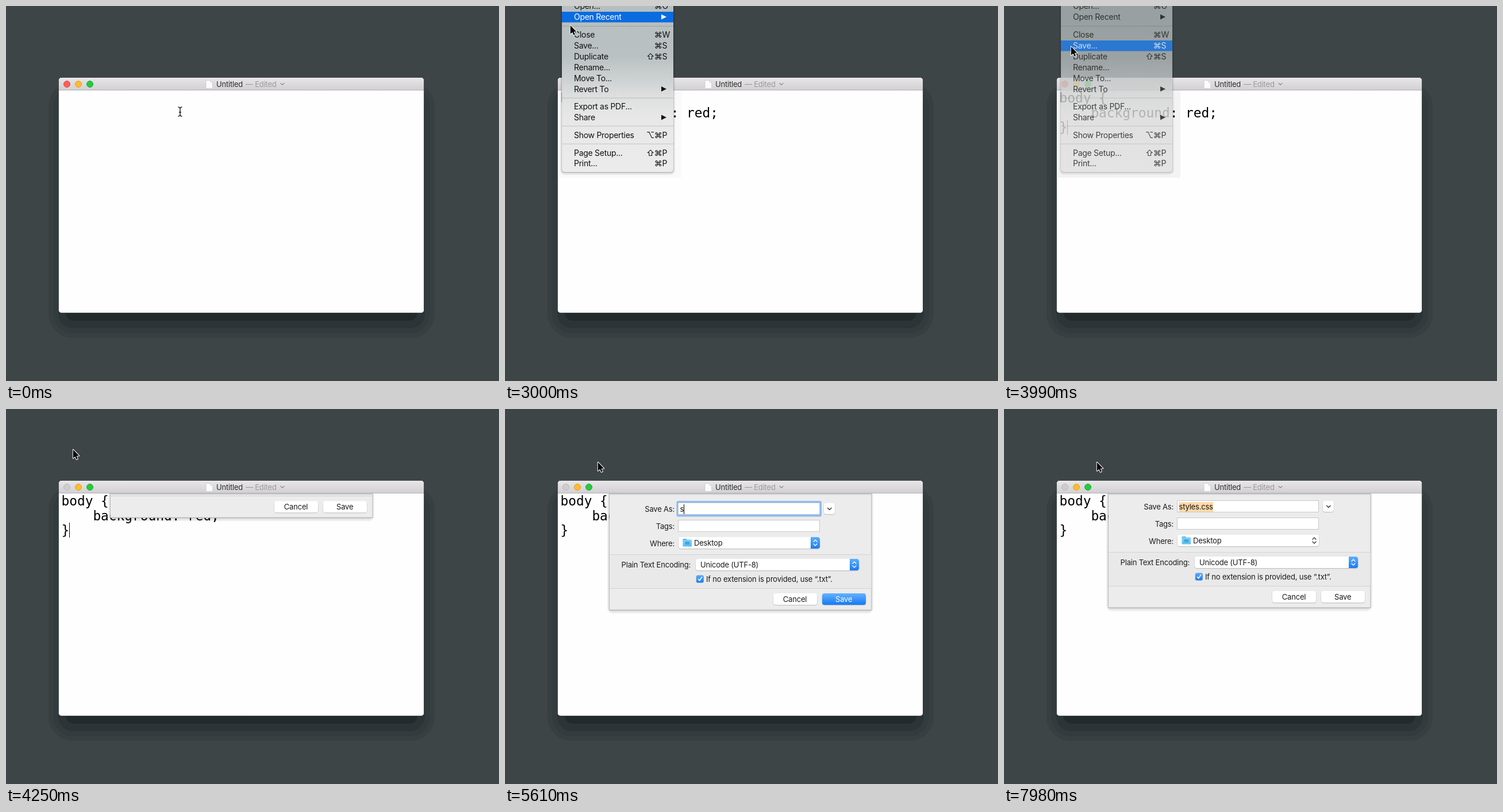
An HTML page with a canvas that plays this animation: 858 by 653 pixels, repeating every 8000 ms.

```html
<!DOCTYPE html>
<html lang="en">
<head>
<meta charset="utf-8">
<title>Saving a stylesheet</title>
<style>
html, body { margin: 0; width: 100%; height: 100%; overflow: hidden; background: #3d4547; }
canvas { display: block; }
</style>
</head>
<body>
<canvas id="stage" width="858" height="653"></canvas>
<script>
const ctx = document.getElementById('stage').getContext('2d');
const LOOP = 8000;
const UI = 'Inter, Roboto, "DejaVu Sans", sans-serif';
const MONO = '"DejaVu Sans Mono", "Liberation Mono", monospace';

function box(x, y, w, h, r, fill, stroke) {
  ctx.beginPath();
  ctx.roundRect(x, y, w, h, r);
  if (fill) { ctx.fillStyle = fill; ctx.fill(); }
  if (stroke) { ctx.strokeStyle = stroke; ctx.lineWidth = 1; ctx.stroke(); }
}

function rect(x, y, w, h, fill) {
  ctx.fillStyle = fill;
  ctx.fillRect(x, y, w, h);
}

function line(points, color, width, close) {
  ctx.beginPath();
  points.forEach(([x, y], i) => i ? ctx.lineTo(x, y) : ctx.moveTo(x, y));
  if (close) ctx.closePath();
  ctx.strokeStyle = color;
  ctx.lineWidth = width;
  ctx.lineCap = ctx.lineJoin = 'round';
  ctx.stroke();
}

function shape(points, fill) {
  ctx.beginPath();
  points.forEach(([x, y]) => ctx.lineTo(x, y));
  ctx.closePath();
  ctx.fillStyle = fill;
  ctx.fill();
}

function text(str, x, y, color = '#1a1a1a', size = 13, align = 'left') {
  ctx.font = size + 'px ' + UI;
  ctx.letterSpacing = size > 13 ? '-0.28px' : '-0.2px';
  ctx.textAlign = align;
  ctx.fillStyle = color;
  ctx.fillText(str, x, y);
}

function fade(y0, y1, ...stops) {
  const g = ctx.createLinearGradient(0, y0, 0, y1);
  stops.forEach((c, i) => g.addColorStop(i / (stops.length - 1), c));
  return g;
}

// Last entry whose time has come
const at = (list, t) => list.reduce((found, e) => e[0] <= t ? e : found, null);

// ---- window ----
function drawWindow(t) {
  rect(0, 0, 858, 653, '#3d4547');
  [[0, '#373f41'], [8, '#323b3d'], [17, '#2b3436'], [30, '#222a2c']].forEach(([d, c]) =>
    box(74 + d, 133 + d, 672 - 2 * d, 445 - 2 * d, Math.max(14, 42 - d), c));
  box(91.5, 124.5, 636, 410, 5, '#fff', 'rgba(10,16,18,.55)');
  box(92, 125, 635, 409, 5, '#fefefe');
  box(92, 125, 635, 22, [5, 5, 0, 0], fade(125, 147, '#e8e6e8', '#d1cfd1'));
  rect(96, 125, 627, 1, '#f1f0f1');
  rect(92, 146, 635, 1, '#b4b2b4');

  const red = t >= 4160 ? ['#cfcdcf', '#bab8ba'] : ['#fc5f57', '#e2463f'];
  [red, ['#fdbc2f', '#e0a028'], ['#28c940', '#1aab2c']].forEach(([fill, edge], i) =>
    box(100.5 + 20 * i, 130.5, 11, 11, 5.5, fill, edge));

  shape([[348, 129], [356, 129], [360, 133], [360, 144], [348, 144]], '#fbfbfb');
  line([[348.5, 129.5], [356, 129.5], [359.5, 133], [359.5, 143.5], [348.5, 143.5]], '#c4c3c4', .7, true);
  line([[356, 129.5], [356, 133], [359.5, 133]], '#c4c3c4', .7);
  text('Untitled', 366, 141, '#2e2e2e');
  text('— Edited', 417, 141, '#9c9a9c');
  line([[478, 134.5], [481, 137.3], [484, 134.5]], '#8f8d8f', 1.3);
}

function drawCode(t) {
  if (t >= 950) {
    ctx.font = '22.8px ' + MONO;
    ctx.letterSpacing = '0px';
    ctx.textAlign = 'left';
    ctx.fillStyle = '#000';
    ['body {', '    background: red;', '}'].forEach((s, i) => ctx.fillText(s, 96.5, 168 + 25.6 * i));
  }
  if (t >= 380 && t < 950) rect(97, 147, 1, 26, '#000');
  const on = t >= 950 && t < 1520 || t >= 2020 && t < 4570;
  if (on) rect(110, 198, 1, 26, '#000');
}

// ---- menu ----
const MENU = [
  ['Open...', 0, '⌘O'], ['Open Recent', 19, '▶'], ['Close', 50, '⌘W'], ['Save...', 69, '⌘S'],
  ['Duplicate', 88, '⇧⌘S'], ['Rename...', 106.5], ['Move To...', 125.5], ['Revert To', 144.5, '▶'],
  ['Export as PDF...', 175, '▶'.slice(1)], ['Share', 194, '▶'], ['Show Properties', 225, '⌥⌘P'],
  ['Page Setup...', 255.5, '⇧⌘P'], ['Print...', 274, '⌘P']
];

function drawMenu(alpha, hot) {
  ctx.save();
  rect(93, 147, 214, 152, alpha < 1 ? `rgba(0,0,0,${.055 * alpha})` : 'rgba(0,0,0,.02)');
  ctx.globalAlpha = alpha;
  box(96, -20, 200, 314, 8, 'rgba(0,0,0,.07)');
  box(98, -20, 196, 311, 6, 'rgba(0,0,0,.16)');
  const g = ctx.createLinearGradient(0, 0, 0, 289);
  [[0, '#b6bebf'], [.3, '#bac1c2'], [.44, '#cdd1d1'], [.53, '#dcdede'], [.66, '#e7e7e7'], [1, '#ececec']]
    .forEach(([p, c]) => g.addColorStop(p, c));
  box(99, -20, 194, 309, 5, g);
  [35, 160, 209.5, 240].forEach(y => rect(99, Math.floor(y) - .5, 194, 1.5, 'rgba(0,0,0,.11)'));
  MENU.forEach(([name, y, keys = ''], i) => {
    const color = i === hot ? '#fff' : '#111';
    if (i === hot) rect(99, y - 9, 194, 18.5, '#0a6ce0');
    const base = y + 5;
    text(name, 120, base, color, 14);
    if (keys === '▶') {
      shape([[272, y - 4.5], [281, y], [272, y + 4.5]], color);
    } else if (keys) {
      const n = keys.length;
      text(keys[n - 1], 273.5, base, color, 14);
      text('⌘', 266.5, base, color, 14, 'center');
      if (n > 2) text(keys[0], 253, base, color, 14, 'center');
    }
  });
  ctx.restore();
}

// ---- save sheet ----
const NAME = 'styles.css';
const KEYS = [5610, 5790, 5890, 5990, 6140, 6260, 6370, 6820, 6970, 7080];
const BLUE = ['#5caefb', '#1a7bf5'];

function arrows(x, y, color) {
  line([[x - 3, y - 2], [x, y - 5], [x + 3, y - 2]], color, 1.4);
  line([[x - 3, y + 2], [x, y + 5], [x + 3, y + 2]], color, 1.4);
}

function button(x, y, w, h, blue) {
  box(x - .5, y + .5, w + 1, h + .8, 4.5, 'rgba(0,0,0,.17)');
  box(x, y, w, h, 4, blue ? fade(y, y + h, '#66b2fb', '#147af6') : '#fff');
}

function popup(x, y, w, blue) {
  button(x, y, w, 20);
  if (blue) box(x + w - 16, y, 16, 20, [0, 4, 4, 0], fade(y, y + 20, ...BLUE));
  arrows(x + w - 8, y + 10, blue ? '#fff' : '#3a3a3a');
}

function field(x, y, w, h) {
  rect(x, y, w, h, '#c9c9c9');
  rect(x + 1, y + 1, w - 2, h - 2, '#fff');
}

function drawSheet(t, dy) {
  const active = t >= 4570 && t < 7980;
  const settled = t >= 4570;
  ctx.save();
  ctx.beginPath();
  ctx.rect(92, 147, 635, 387);
  ctx.clip();
  ctx.translate(0, dy);

  box(178, 100, 463, 256, 9, 'rgba(0,0,0,.06)');
  box(180, 100, 459, 253, 7, 'rgba(0,0,0,.08)');
  rect(181.3, 100, 457, 250.7, '#b0b0b0');
  rect(182, 100, 455.5, 249.5, '#ececec');
  if (settled) {
    rect(182, 253, 455.5, 59, '#e9e9e9');
    rect(182, 253, 455.5, 1, '#d3d3d3');
  }
  rect(182, 312, 455.5, 1, '#d3d3d3');

  [['Save As:', 295, 178.7], ['Tags:', 295, 209], ['Where:', 295, 239], ['Plain Text Encoding:', 323, 276]]
    .forEach(([s, x, y]) => text(s, x, y, '#1a1a1a', 13, 'right'));

  if (active) box(298.5, 160, 252.5, 27.5, 3, '#8dbcf1');
  field(301, 163, 247, 21);
  field(301, 193, 247, 21);

  const typed = KEYS.filter(k => k <= t).length;
  const name = typed ? NAME.slice(0, typed) : 'Untitled';
  ctx.font = '13px ' + UI;
  ctx.letterSpacing = '-0.2px';
  const w = ctx.measureText(name).width;
  if (settled && (!typed || t >= 7980)) rect(304.5, 166, w + .3, 17, '#ffdaa8');
  text(name, 304.5, 179, '#111');
  if (active && typed && t < 7680) rect(Math.round(304 + w), 166, 1, 17, '#000');

  button(555, 164, 19, 19);
  line([[561.5, 172.3], [564.8, 175.5], [568, 172.3]], '#3a3a3a', 1.5);

  popup(302, 223, 246, active);
  box(309.5, 226, 7, 5, 1, '#4cb0e6');
  box(309.5, 227.5, 15.5, 12, 1, fade(227, 240, '#7dd1f8', '#5bbdf0'));
  rect(313.5, 231, 7.5, 5, '#43a5da');
  text('Desktop', 329, 238);

  popup(332, 261, 284, settled);
  text('Unicode (UTF-8)', 340, 276);

  box(332.5, 289.5, 13.5, 13.5, 3, 'rgba(0,0,0,.2)');
  box(333, 289.5, 12.7, 12.7, 3, settled ? fade(289, 302, ...BLUE) : '#fff');
  line([[336.3, 296.3], [338.5, 299], [342.6, 292.6]], settled ? '#fff' : '#222', 1.6);
  text('If no extension is provided, use “.txt”.', 350, 301);

  button(467, 321, 76, 20);
  button(552, 321, 76, 20, active);
  text('Cancel', 504.5, 335.7, '#1a1a1a', 13, 'center');
  text('Save', 589.7, 335.7, active ? '#fff' : '#1a1a1a', 13, 'center');
  ctx.restore();

  const shade = fade(147, 150, 'rgba(0,0,0,.22)', 'rgba(0,0,0,0)');
  rect(182, 147, 455, 3, shade);
}

// ---- pointer ----
function beam(x, y) {
  const half = s => [[x - 3, y - 8 * s], [x - 1.5, y - 7.6 * s], [x, y - 6.3 * s], [x + 1.5, y - 7.6 * s], [x + 3, y - 8 * s]];
  [['rgba(255,255,255,.9)', 3], ['#1c1c1c', 1.4]].forEach(([c, w]) => {
    line([[x, y - 6.5], [x, y + 6.5]], c, w);
    line(half(1), c, w);
    line(half(-1), c, w);
    line([[x - 1.5, y + 1], [x + 1.5, y + 1]], c, w);
  });
}

function arrow(x, y) {
  const p = [[0, 0], [0, 15], [3.5, 11.9], [5.8, 17], [8, 16], [5.8, 11], [10.4, 10.7]]
    .map(([a, b]) => [x + a + .8, y + b + .8]);
  line(p, '#fff', 2, true);
  shape(p, '#000');
}

const POINTER = [
  [0, beam, 303, 184], [1460, beam, 300, 172], [1525, beam, 290, 156], [1590, arrow, 266, 118],
  [1660, arrow, 228, 72], [1725, arrow, 196, 41], [1790],
  [2820, arrow, 108, 0], [2910, arrow, 110, 18], [3000, arrow, 113, 33], [3090, arrow, 114, 46],
  [3175, arrow, 115, 56], [3260, arrow, 116, 63], [3345, arrow, 116, 67], [3430, arrow, 116, 69],
  [3520, arrow, 116, 70], [4840, arrow, 144, 84], [4920, arrow, 161, 92]
];
const HOT = [[0, -1], [2820, 0], [2910, 1], [3090, 2], [3260, 3], [3840, -1], [3910, 3]];
const MENU_ALPHA = [[0, 0], [2290, 1], [3990, .77], [4080, .4], [4160, .1], [4240, 0]];
const SLIDE = [4160, 4240, 4320, 4400, 4480, 4570];

function sheetOffset(t) {
  if (t >= 7980) return -4;
  const step = SLIDE.filter(s => s <= t).pop();
  const u = Math.min(1, (step - 4100) / 422);
  return -203 * (1 - u * u * u * (u * (6 * u - 15) + 10));
}

function draw(t) {
  drawWindow(t);
  drawCode(t);
  if (t >= SLIDE[0]) drawSheet(t, sheetOffset(t));
  const alpha = at(MENU_ALPHA, t)[1];
  if (alpha) drawMenu(alpha, at(HOT, t)[1]);
  const [, cursor, x, y] = at(POINTER, t);
  if (cursor) cursor(x, y);
}

const start = performance.now();
function tick() {
  draw((performance.now() - start) % LOOP);
  requestAnimationFrame(tick);
}
tick();
</script>
</body>
</html>
```
